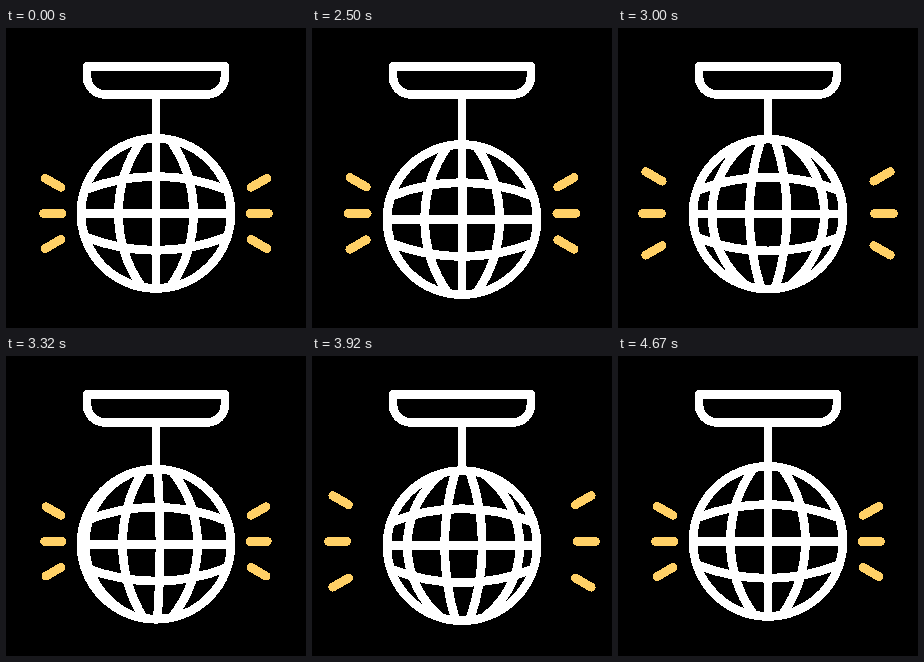
Write an HTML page that moves like this. It is 300 px wide and 300 px high and loops after 4700 ms.

```html
<!DOCTYPE html>
<html lang="en">
<head>
<meta charset="utf-8">
<title>Disco ball</title>
<style>
  html, body { margin: 0; width: 100%; height: 100%; overflow: hidden; background: #000; }
  svg { display: block; width: 100%; height: 100%; shape-rendering: crispEdges; }
  path, circle { fill: none; stroke: #fff; stroke-width: 8.8; stroke-linecap: round; stroke-linejoin: round; }
  #rays { stroke: #ffd066; }
</style>
</head>
<body>
<svg viewBox="0 0 300 300">
  <path d="M81 38.4H219V48.4A18 18 0 0 1 201 66.4H99A18 18 0 0 1 81 48.4Z"/>
  <path id="rope"/>
  <g id="ball">
    <circle cx="150" cy="185.4" r="75"/>
    <path d="M75 185.4H225M79 162A193 193 0 0 1 221 162M79 208.8A193 193 0 0 0 221 208.8"/>
    <path id="meridians"/>
  </g>
  <path id="rays"/>
</svg>
<script>
const LOOP = 4700, CX = 150, CY = 185.4, R = 75;
const BOB = 6.8, CELLS = 10, POLE_SPREAD = 28;
const RAY_PATH = 39.5, RAY_LENGTH = 19, RAY_REST = 18.5;

const TURN = [[2020, 0], [2500, .2], [3000, .45], [3650, .757], [4270, .947], [4690, 1]];
const FLIGHT = [[2020, 0], [2500, 1.02], [3000, 2.22], [3650, 3.72], [4270, 4.93], [4690, 5]];

const [rope, ball, meridians, rays] =
  ['rope', 'ball', 'meridians', 'rays'].map(id => document.getElementById(id));

// Smooth monotone curve through [time, value] keys, coming to rest at the last one.
function track(keys, time) {
  const last = keys.length - 1;
  if (time <= keys[0][0]) return keys[0][1];
  if (time >= keys[last][0]) return keys[last][1];
  const slope = i => (keys[i + 1][1] - keys[i][1]) / (keys[i + 1][0] - keys[i][0]);
  const tangent = i => {
    if (i === 0) return slope(0);
    if (i === last) return 0;
    const a = slope(i - 1), b = slope(i);
    return 2 * a * b / (a + b);
  };
  const i = keys.findIndex(key => key[0] > time) - 1;
  const [t0, v0] = keys[i], [t1, v1] = keys[i + 1];
  const span = t1 - t0, u = (time - t0) / span, w = 1 - u;
  return v0 * w * w * (1 + 2 * u) + v1 * u * u * (1 + 2 * w)
    + span * u * w * (tangent(i) * w - tangent(i + 1) * u);
}

// Circular arc between two points of the rim, bulging to p (-1 to 1) of the radius.
function meridian(p) {
  const end = POLE_SPREAD * p, half = Math.sqrt(R * R - end * end);
  const bulge = Math.abs(p * R - end);
  const x = CX + end, top = CY - half, bottom = CY + half;
  if (bulge < .01) return `M${x} ${top}V${bottom}`;
  const radius = (half * half + bulge * bulge) / (2 * bulge);
  return `M${x} ${top}A${radius} ${radius} 0 0 ${p > 0 ? 1 : 0} ${x} ${bottom}`;
}

// A fixed-length dash sliding outwards along each ray.
function rayPaths(cycles) {
  const span = RAY_PATH + RAY_LENGTH;
  const slide = (RAY_REST + cycles * span) % span;
  const head = Math.min(RAY_PATH, slide), tail = Math.max(0, slide - RAY_LENGTH);
  let d = '';
  for (const side of [-1, 1]) {
    for (const row of [-1, 0, 1]) {
      const angle = row * Math.PI / 6;
      const point = s => {
        const x = CX + side * ((row ? 95 : 94) + s * Math.cos(angle));
        return `${x} ${CY + row * 26 + s * Math.sin(angle)}`;
      };
      d += `M${point(tail)}L${point(head)}`;
    }
  }
  return d;
}

function draw(now) {
  const time = now % LOOP;
  const turn = track(TURN, time);
  const bob = BOB * Math.sin(2 * Math.PI * turn) ** 2;
  const shift = (turn * CELLS) % 1;
  ball.setAttribute('transform', `translate(0 ${bob})`);
  rope.setAttribute('d', `M${CX} 66V${CY - R + bob}`);
  meridians.setAttribute('d', [-2, -1, 0, 1].map(k => meridian((k + shift) / 2)).join(''));
  rays.setAttribute('d', rayPaths(track(FLIGHT, time)));
  requestAnimationFrame(draw);
}
draw(0);
</script>
</body>
</html>
```
